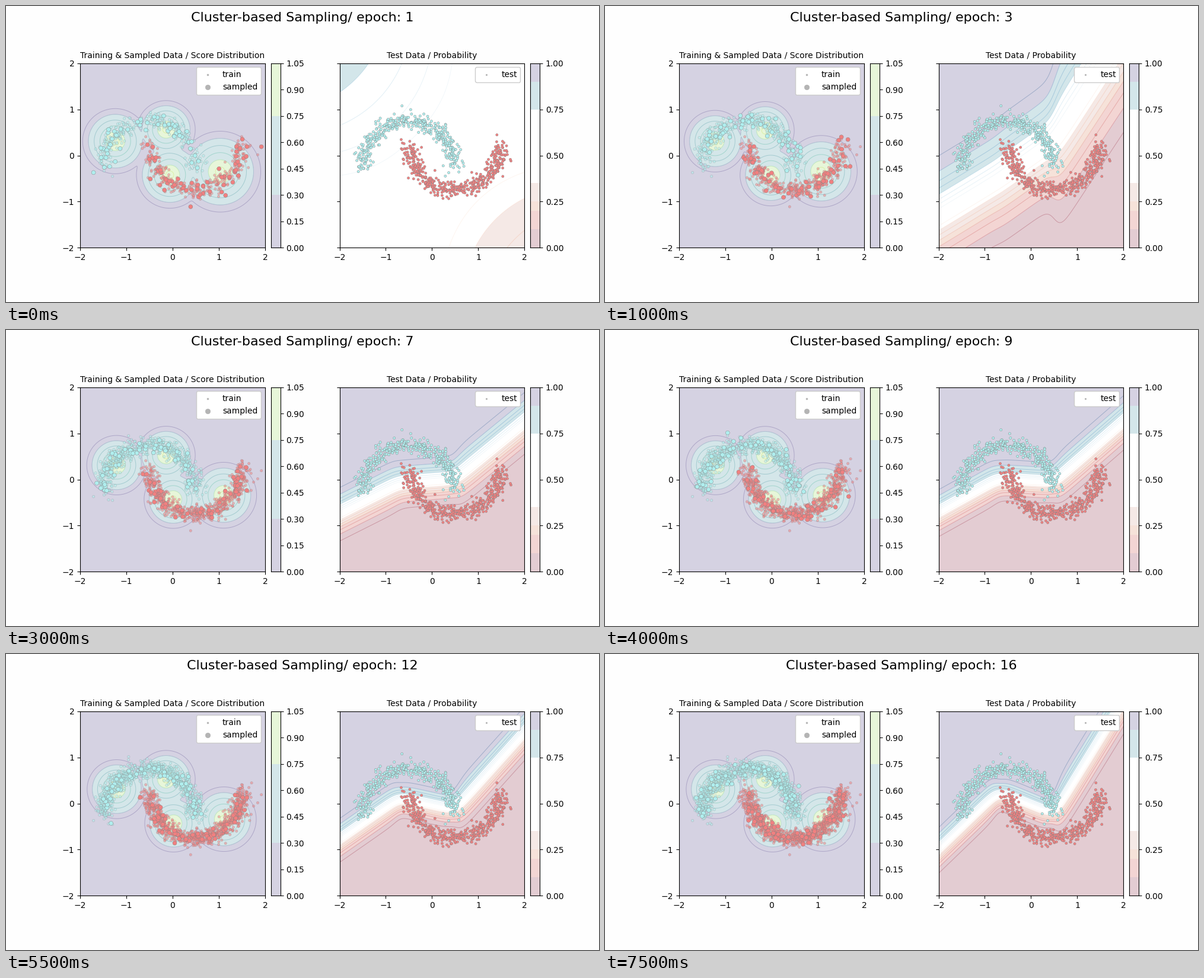
These frames come from a looping animation (1000 by 500 pixels, 8000 ms). A matplotlib script:

```python
import numpy as np
import matplotlib.pyplot as plt
from matplotlib.animation import FuncAnimation
from mpl_toolkits.axes_grid1 import make_axes_locatable

plt.rcParams["font.family"] = "DejaVu Sans"

EPOCHS = 16
BASE, BATCH = 550, 120
TEAL, RED = "paleturquoise", "lightcoral"

SCORE_EDGES = [0, 0.3, 0.75, 1.05]
SCORE_FILL = ["#d5d2e2", "#d4e6e9", "#e7f6d9"]
PROB_EDGES = [0, 0.1, 0.2, 0.25, 0.35, 0.75, 0.9, 1]
PROB_FILL = ["#e3ccd2", "#f3d5d3", "#f6e2d9", "#f5e9e6",
             "#ffffff", "#d3e6ea", "#d5d2e2"]
SCORE_LINES = np.arange(0.15, 1.0, 0.15)
PROB_LINES = np.r_[np.arange(0.05, 0.42, 0.05), np.arange(0.6, 0.97, 0.05)]

rng = np.random.default_rng(7)
gx, gy = np.meshgrid(np.linspace(-2, 2, 200), np.linspace(-2, 2, 200))


# ---------- two moons ----------
def moons(n, noise):
    label = rng.integers(0, 2, n)
    t = rng.uniform(0, np.pi, n)
    sign = 1 - 2 * label
    xy = np.c_[sign * (np.cos(t) - 0.5), sign * (np.sin(t) - 0.25)]
    return xy + rng.normal(0, noise, xy.shape), label


pool, pool_label = moons(BASE + BATCH * EPOCHS, 0.095)
test, test_label = moons(900, 0.09)

# the first batch holds three outliers
pool[BASE:BASE + 3] = (1.92, 0.19), (0.39, -1.11), (-1.71, -0.37)
pool_label[BASE:BASE + 3] = 1, 1, 0


# ---------- score: cones around the cluster centres ----------
# x, y, radius at the start and after settling
START = np.array([(-1.24, 0.31, 0.83), (-0.14, 0.56, 0.74),
                  (-0.06, -0.42, 0.85), (1.03, -0.35, 1.03)])
SETTLED = np.array([(-1.21, 0.31, 0.75), (-0.14, 0.52, 0.74),
                    (0.02, -0.43, 0.73), (1.11, -0.34, 0.82)])


def score(k):
    cones = SETTLED + (START - SETTLED) * np.exp(-0.4 * k)
    total = sum(np.clip(1 - np.hypot(gx - x, gy - y) / r, 0, 1) ** 8
                for x, y, r in cones)
    return np.clip(total ** 0.125, 1e-3, 1.04)


# ---------- probability: a bent boundary that sharpens ----------
def ramp(t, soft=0.08):
    return soft * np.logaddexp(0, t / soft)


def boundary(k):
    """Rise, dip and rise again, with corners near x = -0.7 and x = 0.5."""
    early = np.exp(-k / 2)
    left = 0.38 + 0.0026 * k ** 2 + 0.6 * early
    middle = 0.28 - 0.046 * k + 1.4 * early
    right = 0.5 + 0.005 * k ** 2 + 2.8 * early
    return (middle * gx - 0.05
            - (left - middle) * ramp(-0.7 - gx)
            + (right - middle) * ramp(gx - 0.5))


def untrained():
    v, s = gy - gx, gx + gy
    return 0.27 * (v + 0.15 * np.tanh(v) * (1 - s ** 2)) + 0.165


def probability(k):
    edge = boundary(k)
    slope = np.gradient(edge, gx[0], axis=1)
    gain = 9 * (1 - np.exp(-k / 6))
    z = gain * (gy - edge) / np.hypot(1, slope) + np.exp(-1.2 * k) * untrained()
    return 1 / (1 + np.exp(-np.clip(z, -9, 9)))


# ---------- layout ----------
fig, (left_ax, right_ax) = plt.subplots(
    1, 2, figsize=(10, 5), dpi=100, facecolor="#fefefe",
    gridspec_kw=dict(left=0.125, right=0.9, bottom=0.11, top=0.88,
                     wspace=100 / 337.5))


def setup(ax, title, edges, fills, ticks, entries):
    ax.set(xlim=(-2, 2), ylim=(-2, 2), aspect="equal",
           xticks=range(-2, 3), yticks=range(-2, 3))
    ax.set_title(title, fontsize=10)

    bar = make_axes_locatable(ax).append_axes("right", size="5%", pad=0.1)
    for lo, hi, color in zip(edges, edges[1:], fills):
        bar.axhspan(lo, hi, color=color, lw=0)
    bar.set(xlim=(0, 1), ylim=(edges[0], edges[-1]), xticks=[])
    bar.yaxis.tick_right()
    bar.set_yticks(ticks, [f"{t:.2f}" for t in ticks])

    for name, size in entries:
        ax.scatter([], [], s=size, color="#b4b4b4", lw=0.5, label=name)
    ax.legend(loc="upper right", framealpha=1).set_zorder(6)


setup(left_ax, "Training & Sampled Data / Score Distribution",
      SCORE_EDGES, SCORE_FILL, np.arange(8) * 0.15,
      [("train", 4), ("sampled", 36)])
setup(right_ax, "Test Data / Probability",
      PROB_EDGES, PROB_FILL, np.arange(5) * 0.25, [("test", 3)])
right_ax.tick_params(labelleft=False)
heading = fig.suptitle("", fontsize=16)


def dots(ax, xy, label, size, **style):
    colors = np.where(label == 0, TEAL, RED)
    return ax.scatter(xy[:, 0], xy[:, 1], s=size, c=colors,
                      edgecolors="gray", lw=0.3, **style)


dots(right_ax, test, test_label, 9, zorder=3)


# ---------- animation ----------
live = []


def field(ax, z, edges, fills, lines, cmap):
    fill = ax.contourf(gx, gy, z, levels=edges, colors=fills,
                       antialiased=True, zorder=0)
    line = ax.contour(gx, gy, z, levels=lines, cmap=cmap, vmin=0, vmax=1,
                      linewidths=0.7, alpha=0.28, zorder=1)
    return [fill, line]


def update(k):
    while live:
        live.pop().remove()
    heading.set_text(f"Cluster-based Sampling/ epoch: {k + 1}")
    live.extend(field(left_ax, score(k), SCORE_EDGES, SCORE_FILL,
                      SCORE_LINES, "viridis"))
    live.extend(field(right_ax, probability(k), PROB_EDGES, PROB_FILL,
                      PROB_LINES, "RdBu"))
    n = BASE + BATCH * k
    live.append(dots(left_ax, pool[:n], pool_label[:n], 10,
                     alpha=0.5, zorder=3))
    live.append(dots(left_ax, pool[n:n + BATCH], pool_label[n:n + BATCH], 25,
                     zorder=4))
    return live


anim = FuncAnimation(fig, update, frames=EPOCHS, interval=500,
                     repeat=True, repeat_delay=0, blit=False)
plt.show()
```
